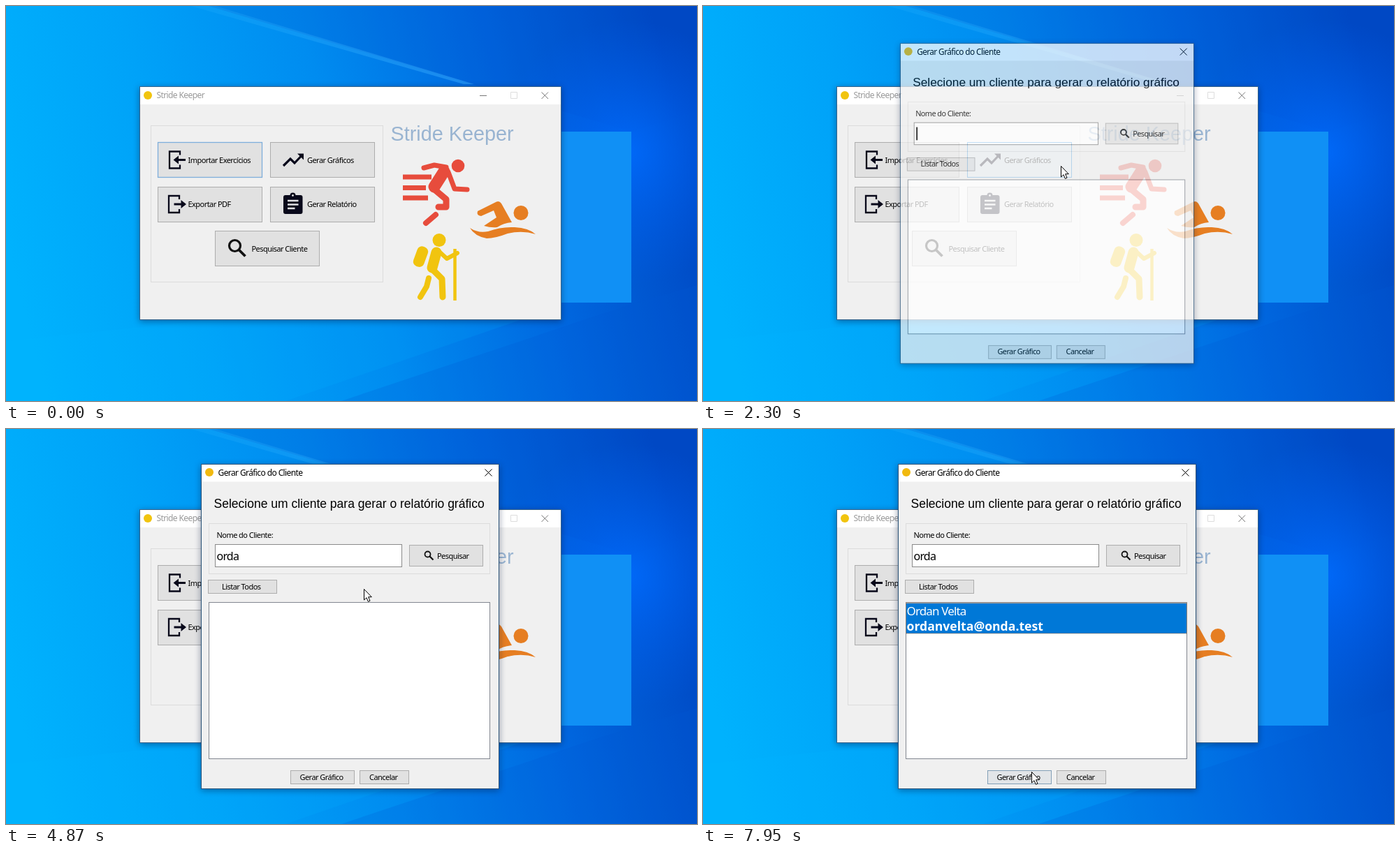
Animation of 989x566 px, one loop 8000 ms. Source, as an HTML page:

```html
<!DOCTYPE html>
<html lang="pt">
<head>
<meta charset="utf-8">
<title>Stride Keeper</title>
<style>
html, body { margin: 0; width: 100%; height: 100%; overflow: hidden; background: #0090f0; }
svg { display: block; width: 100%; height: 100%; }
text { font: 11px "Noto Sans", "Open Sans", sans-serif; letter-spacing: -.05em; white-space: pre; }
.caption { font-size: 12px; }
.head { font: 17.5px "Liberation Sans", Arial, sans-serif; letter-spacing: 0; }
.brand { font: 28.8px "Liberation Sans", Arial, sans-serif; letter-spacing: 0; fill: #99b4d1; }
.typed { font-size: 16px; }
.name { font-size: 17px; }
.mail { font-size: 17.6px; font-weight: 700; letter-spacing: 0; }
.win { filter: drop-shadow(0 2px 5px rgba(0, 20, 60, .45)); }
.line { fill: none; stroke: #000; stroke-width: 1; }
.limb { fill: none; stroke-linecap: round; stroke-linejoin: round; }
</style>
</head>
<body>
<svg viewBox="0 0 989 566" preserveAspectRatio="none">
  <defs>
    <linearGradient id="sky" x1="0" y1=".6" x2="1" y2=".45">
      <stop offset="0" stop-color="#00b2fd"/>
      <stop offset=".25" stop-color="#00a2f8"/>
      <stop offset=".5" stop-color="#008cf0"/>
      <stop offset=".75" stop-color="#0068e0"/>
      <stop offset="1" stop-color="#0049c4"/>
    </linearGradient>
    <radialGradient id="glow" gradientUnits="userSpaceOnUse" cx="890" cy="210" r="190">
      <stop offset="0" stop-color="#006cff" stop-opacity=".85"/>
      <stop offset="1" stop-color="#0060f0" stop-opacity="0"/>
    </radialGradient>
    <linearGradient id="beam" x1="0" x2="1">
      <stop offset="0" stop-color="#30b8ff" stop-opacity=".15"/>
      <stop offset="1" stop-color="#40b0ff" stop-opacity=".45"/>
    </linearGradient>
  </defs>

  <rect width="989" height="566" fill="url(#sky)"/>
  <path d="M290 0L895 180L989 150V0Z" fill="#0048c4" opacity=".2"/>
  <path d="M895 427L480 566H989V400Z" fill="#0058d0" opacity=".22"/>
  <path d="M0 480L794 398V430L400 566H0Z" fill="#00b4ff" opacity=".15"/>
  <rect width="989" height="566" fill="url(#glow)"/>
  <path d="M265 0H300L670 112H655Z" fill="url(#beam)"/>
  <rect x="650" y="180" width="245" height="245" fill="#1090f5"/>

  <g class="win">
    <rect x="191.5" y="115.5" width="603" height="334" fill="#f0f0f0" stroke="#36648c"/>
    <rect x="192" y="116" width="602" height="25" fill="#fff"/>
    <circle cx="203" cy="128" r="6" fill="#f1c40f"/>
    <text class="caption" x="215.5" y="132" fill="#999">Stride Keeper</text>
    <g fill="none" stroke="#777">
      <path d="M678 128.5H688M766.5 123.5L776 133M776 123.5L766.5 133"/>
      <path d="M722.5 123.5H731.5V132.5H722.5Z" stroke="#ddd"/>
    </g>
  </g>
  <rect x="207.5" y="171.5" width="332" height="224" fill="none" stroke="#dcdcdc"/>
  <g id="mainButtons"></g>

  <g fill="none" stroke="#08081a" stroke-width="2.3">
    <path d="M249 213.5V208.5H234V232.5H249V227.5M248 277V272H233V296H248V291"/>
    <path d="M257 220.5H246M240.500 284H252" stroke-width="3"/>
    <path d="M239.500 220.500L247 214.500V226.500ZM258 284L250.500 278V290Z" fill="#08081a" stroke="none"/>
    <path d="M397 229L407 219L413 225L423 214.500" stroke-width="3.2"/>
    <path d="M417 211.500H426V220.500Z" fill="#08081a" stroke="none"/>
  </g>
  <rect x="397" y="271" width="27.500" height="27" rx="3" fill="#08081a"/>
  <circle cx="410.500" cy="271.500" r="4" fill="#08081a"/>
  <circle cx="410.500" cy="271.500" r="1.400" fill="#e1e1e1"/>
  <path d="M403 279H418.500M403 284.500H418.500M403 290H413.500" stroke="#e1e1e1" stroke-width="2.700"/>
  <g fill="none" stroke="#111" stroke-width="3.200">
    <circle cx="327.500" cy="343.500" r="8"/>
    <path d="M333.500 349.500L342.500 358.500" stroke-width="3.800"/>
  </g>

  <text class="brand" x="550.5" y="193">Stride Keeper</text>
  <g stroke="#e74c3c">
    <circle cx="647" cy="229" r="9.300" fill="#e74c3c" stroke="none"/>
    <path d="M568 245H609M568 260.500H601M568 275H604" stroke-width="7"/>
    <path class="limb" d="M598 232L613 228L630 231" stroke-width="7"/>
    <path class="limb" d="M627 237L613 259" stroke-width="17"/>
    <path class="limb" d="M633 238L642 262L660 263" stroke-width="7"/>
    <path class="limb" d="M611 261L630 277L630 288H619" stroke-width="9"/>
    <path class="limb" d="M615 299L601 311" stroke-width="8"/>
  </g>
  <g fill="#e67e22">
    <circle cx="737" cy="296.500" r="10.500"/>
    <path d="M675 294L702 280.500Q706 278.500 709 283L724 310Q712 311 703 317Q694 318 684 315L702 303L698 293L680 301Q673 300 675 294Z"/>
    <path d="M664 318Q676 326 690 323Q708 316 728 317Q748 318 758 327Q739 321 718 326Q700 333 688 333Q671 330 664 318Z"/>
  </g>
  <g stroke="#f1c40f">
    <circle cx="620" cy="335.500" r="9.500" fill="#f1c40f" stroke="none"/>
    <rect x="585.500" y="344" width="16" height="30" rx="7" transform="rotate(20 593 359)" fill="#f1c40f" stroke="none"/>
    <path class="limb" d="M616 353L610 375" stroke-width="15"/>
    <path class="limb" d="M618 350L631 362L646 354" stroke-width="6"/>
    <path class="limb" d="M611 378L624 391L625 417" stroke-width="9"/>
    <path class="limb" d="M605 390L602 402L593 417" stroke-width="8"/>
    <path d="M642.500 348V422" stroke-width="4.500"/>
  </g>

  <g id="dialog">
    <g class="win">
      <rect x="279.5" y="50.5" width="426" height="465" fill="#f0f0f0" stroke="#2c5478"/>
      <rect x="280" y="51" width="425" height="24.500" fill="#fff"/>
    </g>
    <circle cx="291" cy="62" r="6" fill="#f1b90f"/>
    <text class="caption" x="303.500" y="66.500">Gerar Gráfico do Cliente</text>
    <path class="line" d="M685.500 57.500L695.500 67.500M695.500 57.500L685.500 67.500"/>
    <text class="head" x="297.500" y="113">Selecione um cliente para gerar o relatório gráfico</text>
    <rect x="290.500" y="135.500" width="402" height="72" fill="none" stroke="#dcdcdc"/>
    <text x="301.500" y="156">Nome do Cliente:</text>
    <rect x="299.500" y="165.500" width="267" height="32" fill="#fff" stroke="#8a8a8a"/>
    <text id="typed" class="typed" x="301.500" y="187.500"></text>
    <rect id="caret" y="172" width="2" height="19"/>
    <g id="dialogButtons"></g>
    <g fill="none" stroke="#111" stroke-width="1.800">
      <circle cx="603.500" cy="179.500" r="4"/>
      <path d="M606.500 182.500L611.500 187.500" stroke-width="2.200"/>
    </g>
    <rect x="290.500" y="248.500" width="402" height="224" fill="#fff" stroke="#828790"/>
    <g id="result">
      <rect id="picked" x="290.500" y="249.500" width="402" height="43.500" fill="#0078d7" stroke="#d08040" stroke-dasharray="1 1"/>
      <text class="name" x="291.500" y="267">Ordan Velta</text>
      <text class="mail" x="291.500" y="288.500">ordanvelta@onda.test</text>
    </g>
  </g>
  <path id="cursor" d="M.5 .5V16L4 12.700L6.400 18.300L9 17.200L6.600 11.700H11.300Z" fill="#fff" stroke="#000"/>
</svg>
<script>
const LOOP = 8000;
const $ = id => document.getElementById(id);
const set = (el, attrs) => { for (const k in attrs) el.setAttribute(k, attrs[k]); };
const show = (el, on) => set(el, { visibility: on ? "visible" : "hidden" });

function make(parent, tag, attrs) {
  const el = document.createElementNS("http://www.w3.org/2000/svg", tag);
  set(el, attrs);
  return parent.appendChild(el);
}

function button(parent, x, y, w, h, label, tx, ty) {
  const box = make(parent, "rect", { x: x + .5, y: y + .5, width: w, height: h });
  const ring = make(parent, "rect", {
    x: x + 2.5, y: y + 2.5, width: w - 4, height: h - 4,
    fill: "none", stroke: "#222", "stroke-dasharray": "1 1", visibility: "hidden"
  });
  make(parent, "text", { x: tx, y: ty }).textContent = label;
  paint(box, "normal");
  return { box, ring };
}

const LOOKS = {
  normal: ["#e1e1e1", "#adadad", 1],
  pulse: ["#e1e1e1", "#7eaedb", 1.3],
  primary: ["#e1e1e1", "#2f8ad8", 2],
  hover: ["#e5f1fb", "#0078d7", 1],
  warming: ["#e2e5e8", "#829fb7", 1],
  pressed: ["#cce4f7", "#005499", 1]
};
function paint(box, look) {
  const [fill, stroke, width] = LOOKS[look];
  set(box, { fill, stroke, "stroke-width": width });
}

const main = $("mainButtons"), dlg = $("dialogButtons");
const importBtn = button(main, 217, 195, 149, 50, "Importar Exercícios", 260.5, 224.5);
const chartBtn = button(main, 378, 195, 149, 50, "Gerar Gráficos", 431, 224.5);
button(main, 217, 259, 149, 50, "Exportar PDF", 260.5, 288);
button(main, 378, 259, 149, 50, "Gerar Relatório", 431, 288);
button(main, 299, 322, 149, 50, "Pesquisar Cliente", 351.5, 351.5);
const searchBtn = button(dlg, 577, 166, 105, 30, "Pesquisar", 617, 185.5);
button(dlg, 289, 216, 98, 19, "Listar Todos", 309, 229.5);
const plotBtn = button(dlg, 407, 489, 91, 19, "Gerar Gráfico", 420.5, 502.5);
button(dlg, 506, 489, 70, 19, "Cancelar", 520, 502.5);

const easeOut = p => 1 - (1 - p) ** 1.6;
const easeBoth = p => p * p * (3 - 2 * p);

// The pointer advances in discrete steps, as a screen recording does.
const MOVES = [
  { start: 610, end: 1380, steps: 11, from: [830, 560], to: [529, 235], ease: easeOut },
  { start: 1460, end: 1690, steps: 4, from: [529, 235], to: [512, 229], ease: easeOut },
  { start: 6180, end: 6640, steps: 7, from: [512, 229], to: [479, 268], ease: easeBoth },
  { start: 7330, end: 7950, steps: 9, from: [479, 268], to: [470, 491], ease: easeBoth }
];
function pointer(t) {
  const m = MOVES.filter(m => t >= m.start).pop();
  if (!m) return null;
  const gap = (m.end - m.start) / (m.steps - 1);
  const step = Math.min(m.steps, Math.floor((t - m.start) / gap + .05) + 1);
  const p = m.ease(step / m.steps);
  return m.from.map((a, i) => a + (m.to[i] - a) * p);
}

const KEYS = [3620, 4080, 4250, 4400];
const CARET_X = [302.5, 311, 317, 326, 335];
const CARET_OFF = [[2690, 3220], [4870, 5400], [5870, 6400], [6870, LOOP]];
const OPENING = [[2230, .35, .955], [2300, .76, .986], [2380, .94, .996], [2460, 1, 1]];

function draw(t) {
  paint(importBtn.box, t < 70 ? "pulse" : t < 2230 ? "primary" : "normal");
  paint(chartBtn.box, t < 1460 ? "normal" : t < 1990 || t >= 2230 ? "hover" : "pressed");
  show(chartBtn.ring, t >= 1990 && t < 2230);

  const open = OPENING.filter(o => t >= o[0]).pop();
  $("dialog").style.display = open ? "" : "none";
  if (open) {
    const [, opacity, s] = open;
    set($("dialog"), { opacity, transform: `translate(492.5 283) scale(${s}) translate(-492.5 -283)` });
  }

  const typed = KEYS.filter(k => t >= k).length;
  $("typed").textContent = "orda".slice(0, typed);
  set($("caret"), { x: CARET_X[typed] });
  show($("caret"), !CARET_OFF.some(([a, b]) => t >= a && t < b));

  paint(searchBtn.box, t >= 5270 && t < 5420 ? "pressed" : t >= 5420 && t < 5490 ? "warming" : "normal");
  paint(plotBtn.box, t >= 7940 ? "warming" : "normal");

  const picked = t >= 6950;
  $("result").style.display = t >= 5340 ? "" : "none";
  $("picked").style.display = picked ? "" : "none";
  set($("result"), { fill: picked ? "#fff" : "#000" });

  const at = pointer(t);
  show($("cursor"), !!at);
  if (at) set($("cursor"), { transform: `translate(${at.map(Math.round)})` });
}

const begin = performance.now();
function tick() {
  draw((performance.now() - begin) % LOOP);
  requestAnimationFrame(tick);
}
tick();
</script>
</body>
</html>
```
